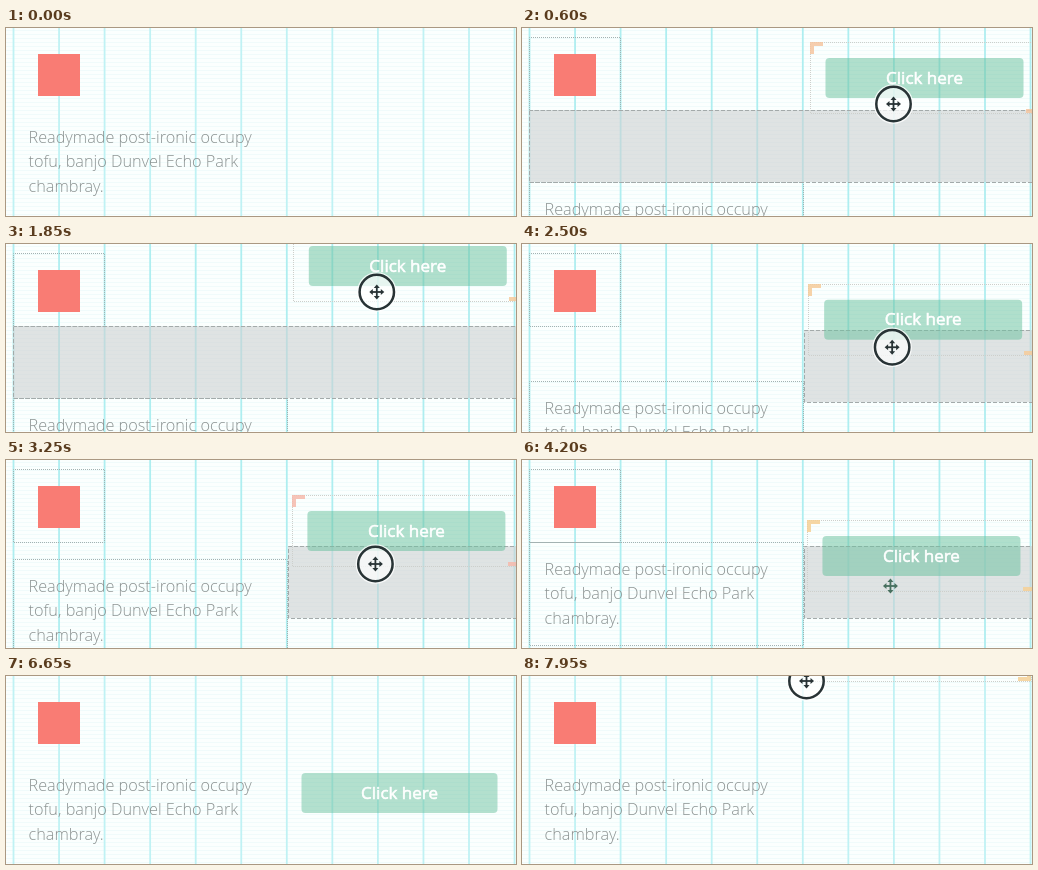
An HTML page with a canvas that plays this animation: 510 by 188 pixels, repeating every 8000 ms.

```html
<!DOCTYPE html>
<html lang="en">
<head>
<meta charset="utf-8">
<title>Drag and drop layout</title>
<style>
  html, body { margin: 0; width: 510px; height: 188px; overflow: hidden; }
  canvas { display: block; }
</style>
</head>
<body>
<canvas id="stage" width="510" height="188"></canvas>
<script>
const ctx = document.getElementById('stage').getContext('2d');
const LOOP = 8000, STEP = 50;
const DRAG_START = 50, DROP = 4350, FADE = 6300, RETURN = 7600;
const GREEN = '#6cc1a0', CYAN = '#8adfe2', SALMON = '#f97c74', INK = '#283335', DOTS = '#a3b2b2';
const PARAGRAPH = ['Readymade post-ironic occupy', 'tofu, banjo Dunvel Echo Park', 'chambray.'];

// Times at which the pointer rises above the paragraph row and sinks back.
const lifts = [[250, 650], [1500, 2405], [2680, 3046]];

const mix = (a, b, p) => a + (b - a) * p;

function ramp(t, start, length) {
  const p = Math.max(0, Math.min(1, (t - start) / length));
  return p * p * (3 - 2 * p);
}

// 0 to 1 and back for every lift, optionally ahead of time.
const lifted = (t, lead = 0) => lifts.reduce(
  (sum, [up, down]) => sum + ramp(t, up - lead, 300) - ramp(t, down - lead, 300), 0);

function line(x1, y1, x2, y2, color, width = 1) {
  ctx.strokeStyle = color;
  ctx.lineWidth = width;
  ctx.beginPath();
  ctx.moveTo(x1, y1);
  ctx.lineTo(x2, y2);
  ctx.stroke();
}

function frame(x, y, w, h, color, dash = []) {
  ctx.strokeStyle = color;
  ctx.lineWidth = 1;
  ctx.setLineDash(dash);
  ctx.lineDashOffset = .5;
  ctx.strokeRect(x + .5, y + .5, w, h);
  ctx.setLineDash([]);
}

function circle(radius, width, color) {
  ctx.strokeStyle = color;
  ctx.lineWidth = width;
  ctx.beginPath();
  ctx.arc(0, 0, radius, 0, Math.PI * 2);
  ctx.stroke();
}

function triangle(ax, ay, bx, by, cx, cy, color) {
  ctx.fillStyle = color;
  ctx.beginPath();
  ctx.moveTo(ax, ay);
  ctx.lineTo(bx, by);
  ctx.lineTo(cx, cy);
  ctx.closePath();
  ctx.fill();
}

function drawGrid(strong) {
  ctx.fillStyle = '#fbfffe';
  ctx.fillRect(0, 0, 510, 188);
  for (let y = 2.5; y < 188; y += 4) line(0, y, 510, y, '#f0fbfb');
  for (let x = 7.5; x < 510; x += 45.55) line(x, 0, x, 188, strong ? '#aeeef0' : '#c0f2f4', 1.8);
}

function drawContent(gap) {
  ctx.fillStyle = SALMON;
  ctx.fillRect(32, 26, 42, 42);
  ctx.fillStyle = '#8b9291';
  ctx.font = '300 16.25px "Open Sans", sans-serif';
  ctx.textAlign = 'left';
  PARAGRAPH.forEach((text, i) => ctx.fillText(text, 22.5, 115 + i * 24.3 + gap));
}

function drawButton(x, y, alpha, width = 198) {
  ctx.save();
  ctx.globalAlpha = alpha;
  ctx.fillStyle = GREEN;
  ctx.beginPath();
  ctx.roundRect(x, y, width, 40, 4);
  ctx.fill();
  ctx.globalAlpha = Math.min(1, alpha * 2);
  ctx.fillStyle = ctx.strokeStyle = '#fff';
  ctx.lineWidth = .6;
  ctx.font = '400 17px "Open Sans", sans-serif';
  ctx.textAlign = 'center';
  ctx.fillText('Click here', x + width / 2, y + 25.5);
  ctx.strokeText('Click here', x + width / 2, y + 25.5);
  ctx.restore();
}

function drawPlaceholder(x, y, w, h) {
  ctx.fillStyle = 'rgba(205,208,210,.6)';
  ctx.fillRect(x, y, w, h);
  frame(x, y, w, h, '#a3aaaa', [4, 2]);
}

function drawHandles(x, y, warm) {
  const w = 229, h = 71;
  frame(x, y, w, h, '#cdcfcb', [1, 1]);
  ctx.fillStyle = `rgba(246,${mix(208, 186, warm)},${mix(150, 172, warm)},.85)`;
  for (const [side, turn] of [[0, 1], [1, -1]]) {
    const cx = x + side * w, cy = y + side * h;
    ctx.fillRect(cx, cy, 13 * turn, 4 * turn);
    ctx.fillRect(cx, cy + 4 * turn, 4 * turn, 8 * turn);
  }
}

function drawMovePointer(x, y, ring) {
  const color = ring ? INK : '#47705f';
  ctx.save();
  ctx.translate(x + .5, y);
  if (ring) {
    circle(8.5, 17, 'rgba(255,255,255,.7)');
    circle(19, 1.5, 'rgba(255,255,255,.8)');
    circle(17.2, 2.5, INK);
  }
  for (let i = 0; i < 4; i++) {
    line(0, 0, 0, -5, color, 1.8);
    triangle(-3, -4, 0, -7.5, 3, -4, color);
    ctx.rotate(Math.PI / 2);
  }
  ctx.restore();
}

function drawArrow(x, y) {
  line(x + 3, y + 7, x + 6.3, y + 14.5, '#222', 2.4);
  triangle(x, y, x, y + 13, x + 9.3, y + 9.2, '#222');
}

function drawDrag(x, y, gripX, gripY, warm, ring = true) {
  const left = x - gripX, top = y - gripY;
  drawHandles(Math.round(left - 15.7), Math.round(top - 16), warm);
  drawButton(left, top, .52);
  drawMovePointer(x, y, ring);
}

function drawPlacing(t) {
  const gap = Math.round(72 * lifted(t));
  const above = lifts.some(([up, down]) => t >= up && t < down);
  drawContent(gap);
  if (t >= 150) {
    frame(7, 9, 91, 73, DOTS, [1, 1]);
    frame(7, 82 + gap, 274, 103, DOTS, [1, 1]);
    if (above) drawPlaceholder(7, 82, 503, gap);
    else if (t > 600) drawPlaceholder(282, 86, 228, 72);
  }
  const enter = ramp(t, DRAG_START, 550), release = ramp(t, 3500, 700);
  const x = 371 - Math.max(0, t - 1150) / 1000;
  const y = mix(-26, 104, enter) - 56 * lifted(t, 200) + 22 * release;
  const gripY = 46 + 7 * ramp(t, 2200, 1000) - 3 * release;
  const warm = .5 + .5 * Math.cos((t - 1150) / 2100 * Math.PI * 2);
  drawDrag(x, y, 67.5, gripY, warm, t < 4100);
}

function drawSelecting(t) {
  drawContent(0);
  const drop = ramp(t, DROP, 250);
  const alpha = mix(.52, 1, drop) * (1 - ramp(t, FADE, 700));
  drawButton(mix(300.5, 295.5, drop), mix(76, 97, drop), alpha, mix(198, 196, drop));
  if (t >= 6050) return;
  const approach = ramp(t, DROP, 550), select = ramp(t, 4900, 550), extend = ramp(t, 5550, 450);
  const x = Math.round(368 - 211 * approach - 116 * select - 21 * extend);
  const y = Math.round(126 - 91 * approach + 103 * select + 34 * extend);
  if (x < 281) frame(7, 10, 273, 174, CYAN);
  if (select > 0) {
    ctx.fillStyle = 'rgba(226,247,245,.6)';
    ctx.fillRect(x, 35, 157 - x, y - 35);
    frame(x, 35, 156 - x, y - 35, '#93d5c9');
  }
  drawArrow(x, y);
}

function draw(t) {
  drawGrid(t >= 150 && t < DROP);
  if (t >= DRAG_START && t < DROP) drawPlacing(t);
  else if (t >= DROP && t < 7050) drawSelecting(t);
  else {
    drawContent(0);
    if (t >= RETURN) drawDrag(284, mix(-24, 5, ramp(t, RETURN, 350)), -12, 55, 0);
  }
}

const begin = performance.now();
function tick() {
  const t = (performance.now() - begin) % LOOP;
  draw(Math.floor(t / STEP) * STEP);
  requestAnimationFrame(tick);
}
tick();
</script>
</body>
</html>
```
